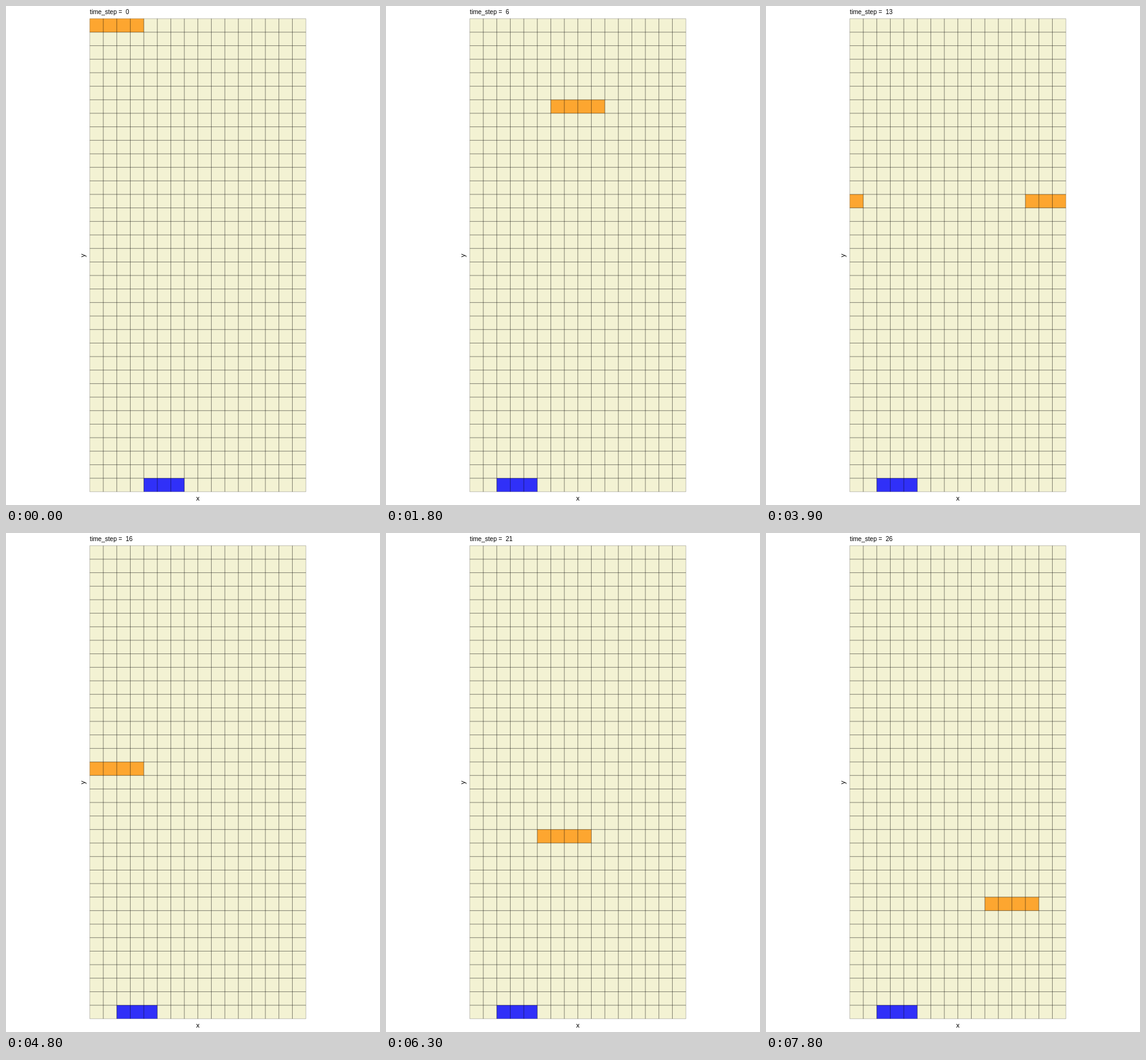
Recreate the animation shown at these times as an HTML page. Size 600 px wide and 800 px high, loop 8000 ms.

```html
<!DOCTYPE html>
<html lang="en">
<head>
<meta charset="utf-8">
<title>Grid steps</title>
<style>
  html, body { margin: 0; width: 100%; height: 100%; overflow: hidden; background: #fff; }
  svg { display: block; width: 600px; height: 800px; }
  text { font-family: "Liberation Sans", Arial, sans-serif; fill: #000; white-space: pre; }
</style>
</head>
<body>
<svg viewBox="0 0 600 800">
  <text id="label" x="134.4" y="13" font-size="10"></text>
  <text x="307.8" y="793" font-size="11" text-anchor="middle">x</text>
  <text transform="translate(127 400) rotate(-90)" font-size="11" text-anchor="middle">y</text>
  <path id="field" fill="#f3f2d3"/>
  <path id="block" fill="#fda630"/>
  <path id="paddle" fill="#3030f8"/>
  <path id="grid" fill="none" stroke="#000" stroke-opacity=".6" stroke-width=".75"/>
  <path id="frame" fill="none" stroke="#000" stroke-opacity=".3" stroke-width=".75"/>
</svg>
<script>
const COLS = 16, ROWS = 35, CELL = 21.67, LEFT = 134.4, TOP = 20.3;
const STEP = 300, LOOP = 8000;
const $ = id => document.getElementById(id);
const px = col => LEFT + col * CELL;
const py = row => TOP + row * CELL;
const box = (col, row, w, h) =>
  `M${px(col)} ${py(row)}h${w * CELL}v${h * CELL}h${-w * CELL}z`;

// A run of cells that wraps around the right edge
function run(col, row, count) {
  let d = "";
  for (let i = 0; i < count; i++) d += box((col + i) % COLS, row, 1, 1);
  return d;
}

let lines = "";
for (let c = 1; c < COLS; c++) lines += `M${px(c)} ${TOP}V${py(ROWS)}`;
for (let r = 1; r < ROWS; r++) lines += `M${LEFT} ${py(r)}H${px(COLS)}`;
$("grid").setAttribute("d", lines);
for (const id of ["field", "frame"]) $(id).setAttribute("d", box(0, 0, COLS, ROWS));

let shown = -1;
function draw(time) {
  const step = Math.floor((time % LOOP) / STEP);
  if (step !== shown) {
    shown = step;
    $("label").textContent = `time_step =  ${step}`;
    $("block").setAttribute("d", run(step % COLS, step, 4));
    $("paddle").setAttribute("d", run(Math.max(2, 4 - step), ROWS - 1, 3));
  }
}

const start = performance.now();
function tick() {
  draw(performance.now() - start);
  requestAnimationFrame(tick);
}
tick();
</script>
</body>
</html>
```
